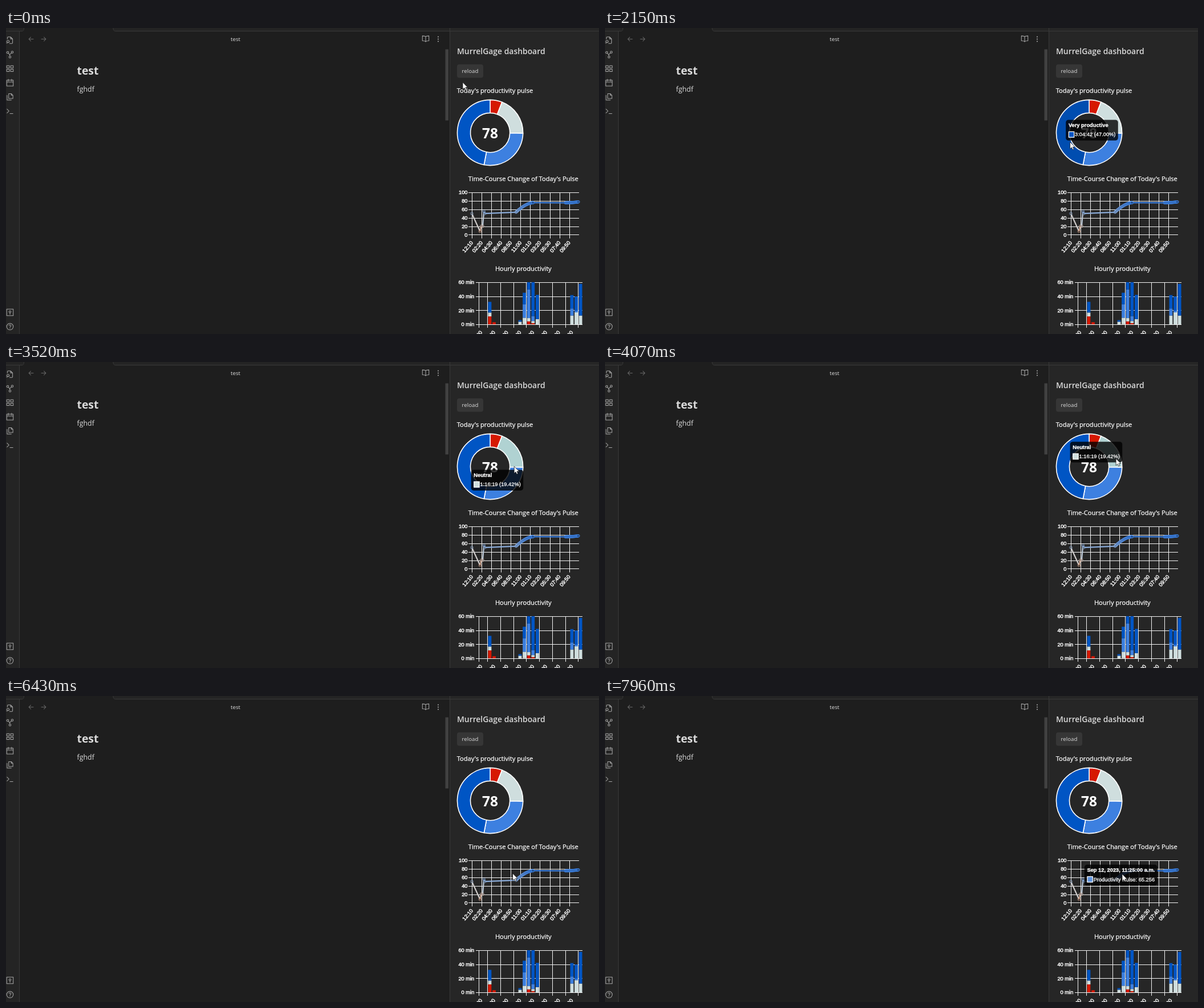
Write an HTML page that moves like this. It is 1040 px wide and 538 px high and loops after 8 s.

```html
<!DOCTYPE html>
<html lang="en">
<head>
<meta charset="utf-8">
<title>Productivity dashboard</title>
<style>
  html, body { margin: 0; width: 100%; height: 100%; overflow: hidden; background: #1e1e1e; }
  svg { display: block; width: 100vw; height: 100vh; }
  text { font-family: "Open Sans", "Noto Sans", sans-serif; fill: #dadada; white-space: pre; }
  .title { font-size: 11.1px; fill: #fff; stroke: #fff; stroke-width: .25px; }
  .axis, .tip { font-family: "Liberation Sans", Arial, sans-serif; font-size: 9.3px; fill: #fff; stroke: #fff; }
  .axis { stroke-width: .45px; }
  .tip { stroke-width: .3px; }
  .bold { font-weight: 700; }
  .icon { fill: none; stroke: #a6a6a6; stroke-width: 1.8; stroke-linecap: round; stroke-linejoin: round; }
  .faint { opacity: .55; }
  .grid { fill: none; stroke: #f4f4f4; stroke-width: 1; }
</style>
</head>
<body>
<svg id="stage" viewBox="0 0 1040 538" preserveAspectRatio="none"></svg>
<script>
const stage = document.getElementById("stage");
const RED = "#d61800", NEUTRAL = "#cfdede", LIGHT = "#3d80e0", DARK = "#0055c4";
const LOOP = 8000;

const mix = (a, b, k) => a + (b - a) * k;
const clamp = (v, low, high) => Math.max(low, Math.min(high, v));
const bell = (x, width) => Math.exp(-x * x / width);
const range = (n, fn) => Array.from({ length: n }, (_, i) => fn(i));
const pad = n => String(n).padStart(2, "0");
const crisp = v => Math.round(v) + .5;

// Piecewise linear lookup: rows are [key, value, value, ...].
function lookup(rows, key) {
  if (key <= rows[0][0]) return rows[0].slice(1);
  const next = rows.findIndex(row => row[0] > key);
  if (next < 0) return rows.at(-1).slice(1);
  const a = rows[next - 1], b = rows[next];
  const k = (key - a[0]) / (b[0] - a[0]);
  return a.slice(1).map((v, i) => mix(v, b[i + 1], k));
}

const rect = (x, y, w, h, fill, extra = "") =>
  `<rect x="${x}" y="${y}" width="${w}" height="${h}" fill="${fill}" ${extra}/>`;
const text = (x, y, value, cls = "", extra = "") =>
  `<text x="${x}" y="${y}" class="${cls}" ${extra}>${value}</text>`;
const icon = (x, y, d, cls = "") =>
  `<path class="icon ${cls}" transform="translate(${x} ${y}) scale(.57) translate(-12 -12)" d="${d}"/>`;
const ring = (x, y, r) => `M${x - r} ${y}a${r} ${r} 0 1 0 ${2 * r} 0a${r} ${r} 0 1 0 ${-2 * r} 0`;
const box = (x, y, w, h) => `M${x} ${y}h${w}v${h}h${-w}z`;
const middle = 'text-anchor="middle"';
const tickLabel = (x, y, value) => text(x, y + 3.2, value, "axis", 'text-anchor="end"');
const slanted = (x, y, value) =>
  text(0, 3.3, value, "axis", `text-anchor="end" transform="translate(${x} ${y}) rotate(-50)"`);

function editor() {
  const ribbon = [
    "M14 2v6h6M4 8V4a2 2 0 0 1 2-2h8l6 6v12a2 2 0 0 1-2 2h-7M2 21l2-2" + ring(6, 16, 3.5),
    ring(5, 6, 3) + ring(19, 5, 3) + ring(12, 20, 3) + "M7 8l4 5 6-6M11 13l1 4",
    box(2, 3, 8, 7) + box(14, 3, 8, 7) + box(2, 14, 8, 7) + box(14, 14, 8, 7),
    box(2, 4, 20, 18) + "M2 10h20M7 1v6M17 1v6",
    "M16 2H8v15h13V7zM16 2v5h5M3 7v15h13",
    "M3 18l6-6-6-6M12 20h9",
  ];
  return rect(0, 0, 1040, 538, "#1e1e1e")
    + rect(0, 0, 24, 538, "#242424") + rect(0, 0, 1040, 5, "#242424")
    + rect(779, 0, 261, 538, "#262626")
    + `<path d="M28 5.5Q31.5 5.5 31.5 0H188Q188 5.5 191.5 5.5Z" fill="#1e1e1e"/>
       <path d="M0 5.5H28Q31.5 5.5 31.5 0M188 0Q188 5.5 191.5 5.5H1040M23.5 5.5V538M778.5 0V538"
         fill="none" stroke="#393939"/>`
    + rect(770.5, 37.5, 5.5, 125, "#414141")
    + ribbon.map((d, i) => icon(7, 21.5 + i * 24.9, d)).join("")
    + icon(7, 500, box(2, 2, 20, 20) + ring(12, 10, 3) + "M12 13v5")
    + icon(7, 525, ring(12, 12, 10) + "M9 9a3 3 0 1 1 4 3q-1 1-1 2M12 17.5v.5")
    + icon(44, 19.5, "M19 12H5M11 6l-6 6 6 6", "faint")
    + icon(66, 19.5, "M5 12h14M13 6l6 6-6 6", "faint")
    + icon(736, 19, "M12 6v15M12 6q-2-3-10-3v15q8 0 10 3q2-3 10-3V3q-8 0-10 3")
    + icon(758, 19.5, ring(12, 5, 1) + ring(12, 12, 1) + ring(12, 19, 1))
    + text(402.5, 23.3, "test", "", `font-size="9.75" ${middle}`)
    + text(124.5, 82, "test", "bold", 'font-size="19.4"')
    + text(124.5, 111.5, "fghdf", "", 'font-size="12.4"')
    + text(791, 45.8, "MurrelGage dashboard", "", 'font-size="13.9" font-weight="600"')
    + rect(791, 64, 46, 23.5, "#363636", 'rx="4"')
    + text(814, 79.3, "reload", "", `font-size="9.7" ${middle}`)
    + text(790.7, 114, "Today's productivity pulse", "title")
    + text(907.3, 269, "Time-Course Change of Today's Pulse", "title", middle)
    + text(907.3, 426.7, "Hourly productivity", "title", middle);
}

// Doughnut chart
const donut = { x: 849.1, y: 184, outer: 57.6, inner: 34.6 };
const segments = [
  { share: 5.9, color: RED, hover: "#c01600" },
  { share: 19.42, color: NEUTRAL, hover: "#b0d2d2", title: "Neutral", label: "1:16:19 (19.42%)" },
  { share: 27.68, color: LIGHT, hover: "#026fff", title: "Productive", label: "1:48:47 (27.68%)" },
  { share: 47, color: DARK, hover: "#004db0", title: "Very productive", label: "3:04:42 (47.00%)" },
];
segments.forEach((s, i) => {
  s.start = i ? segments[i - 1].end : 0;
  s.end = s.start + s.share;
});

function onDonut(r, share) {
  const a = share / 100 * 2 * Math.PI;
  return [donut.x + r * Math.sin(a), donut.y - r * Math.cos(a)];
}

function doughnut() {
  const { outer, inner } = donut;
  return segments.map(({ start, end, color }) =>
    `<path class="segment" fill="${color}" stroke="#fff" stroke-width="1.6" stroke-linejoin="round"
      d="M${onDonut(outer, start)}A${outer} ${outer} 0 0 1 ${onDonut(outer, end)}
         L${onDonut(inner, end)}A${inner} ${inner} 0 0 0 ${onDonut(inner, start)}Z"/>`).join("")
    + text(donut.x, 193.8, "78", "bold", `font-size="24.5" ${middle} style="fill:#fff"`);
}

// Line chart: one sample every five minutes.
const SAMPLE = .656, MORNING = 46;
const pulseY = value => 363.4 - value * .745;
const pulseStops = [[8, 212, 158, 128], [32, 206, 210, 214], [75, 61, 128, 224]];
const pulseColor = value => `rgb(${lookup(pulseStops, value).map(Math.round)})`;
const morningX = i => 894.4 + i * SAMPLE;
const morningPulse = i => 53 + 22.5 * (1 - (1 - i / MORNING) ** 1.7055);

function lineChart() {
  const points = [
    [817, 50], [831.4, 8], [833.4, 20], [836, 20], [838.2, 55], [839.6, 50],
    ...range(MORNING + 1, i => [morningX(i), morningPulse(i)]),
    ...range(36, i => [981 + i * SAMPLE, 75.3 + i * i / 560]),
  ];
  const tickX = i => 817 + i * 17.07;
  const lines = range(6, i => `M811 ${crisp(pulseY(i * 20))}H1005`).join("")
    + range(11, i => `M${crisp(tickX(i))} 289V370`).join("");
  const clock = i => {
    const minutes = 10 + i * 130;
    return `${pad(Math.floor(minutes / 60) % 12 || 12)}:${pad(minutes % 60)}`;
  };
  return `<path class="grid" d="${lines}"/>`
    + range(6, i => tickLabel(809.5, pulseY(i * 20), i * 20)).join("")
    + range(11, i => slanted(tickX(i), 375.6, clock(i))).join("")
    + points.slice(1).map(([x, v], i) => {
        const [px, pv] = points[i];
        return `<path d="M${px} ${pulseY(pv)}L${x} ${pulseY(v)}" stroke="${pulseColor((v + pv) / 2)}" stroke-width="2.2"/>`;
      }).join("")
    + points.map(([x, v]) =>
        `<circle cx="${x}" cy="${pulseY(v)}" r="2.3" fill="#0002" stroke="${pulseColor(v)}" stroke-width=".8"/>`).join("");
}

// Bar chart: each session gives the minutes of an hour by kind; the rest of the total is dark.
const sessions = [
  { from: 2, to: 3, total: h => 32 - 29 * (h - 2), red: h => 11.3 - 8 * (h - 2),
    neutral: h => 5.3 * (3 - h), light: h => 3 - h },
  { from: 9, to: 13, total: h => 66 - 10 * (h - 11.45) ** 2, red: h => 5 - 4 * Math.abs(h - 11.2),
    neutral: h => 1.5 + 4.5 * Math.abs(h - 11.7), light: h => 43 * bell(h - 10.8, .8) },
  { from: 21, to: 23, total: h => 38 + 10 * (h - 21.6) ** 2, red: () => 0,
    neutral: h => 17 - 4.5 * Math.abs(h - 22), light: h => 10 * bell(h - 21, .7) },
];

function barChart() {
  const slot = 7.58, left = 829.5;
  const minuteY = minutes => 521 - minutes * 1.235;
  const gridX = [left, ...range(8, i => left + (2 + 3 * i) * slot)];
  const lines = range(4, i => `M824 ${crisp(minuteY(i * 20))}H1011`).join("")
    + gridX.map(x => `M${crisp(x - .5)} 447V527`).join("");

  function bar(session, hour) {
    const total = clamp(session.total(hour), 0, 60);
    const red = clamp(session.red(hour), 0, total);
    const neutral = clamp(session.neutral(hour), 0, (total - red) * .6);
    const light = session.light(hour);
    let sum = 0;
    return [[RED, red], [NEUTRAL, neutral], [LIGHT, light], [DARK, total - red - neutral - light]]
      .map(([color, minutes]) => {
        const height = Math.max(0, minutes);
        sum += height;
        return rect(left + hour * slot + .9, minuteY(sum), 5.8, height * 1.235, color);
      }).join("");
  }

  return `<path class="grid" d="${lines}"/>`
    + range(4, i => tickLabel(821.3, minuteY(i * 20), `${i * 20} min`)).join("")
    + range(8, i => slanted(left + (.5 + 3 * i) * slot, 533.5, pad(i * 3) + ":00")).join("")
    + sessions.map(s => range(s.to - s.from + 1, i => bar(s, s.from + i)).join("")).join("");
}

// Hover script
function overSegment(t, segment) {
  const { start, end, title, label, color } = segments[segment];
  const [x, y] = onDonut(46, (start + end) / 2);
  return { t, x: clamp(x, 854, 861.4), y, w: 91.6, title, label, color, segment, alpha: 1 };
}

function overSample(t, i) {
  const value = morningPulse(i), minutes = 600 + i * 5;
  return {
    t, x: morningX(i) - .8, y: pulseY(value), w: 128, segment: -1, alpha: 1, color: pulseColor(value),
    title: `Sep 12, 2023, ${Math.floor(minutes / 60)}:${pad(minutes % 60)}:00 a.m.`,
    label: `Productivity Pulse: ${+value.toFixed(3)}`,
  };
}

const hovers = [
  overSegment(1620, 3), overSegment(2575, 2), overSegment(3450, 1), { t: 4700, alpha: 0, segment: -1 },
  ...range(5, k => overSample(k ? 6980 + k * 150 : 6500, Math.round(k * 17 / 4))),
];

// Tooltips glide to their new place while fading.
function pose(tip, t) {
  const age = t - tip.t, from = tip.from;
  const k = 1 - (1 - clamp(age / 400, 0, 1)) ** 4;
  const glide = from && from.alpha > 0;
  return {
    x: glide ? mix(from.x, tip.x, k) : tip.x,
    y: glide ? mix(from.y, tip.y, k) : tip.y,
    alpha: mix(from ? from.alpha : 0, tip.alpha, clamp(age / 200, 0, 1)),
  };
}

function tooltip(tip, t) {
  const { x, y, alpha } = pose(tip, t);
  return `<g opacity="${alpha}" transform="translate(${x - tip.w / 2} ${y - 18.2})">`
    + rect(0, 0, tip.w, 36.4, "#000", 'fill-opacity=".8" rx="4.6"')
    + text(4.7, 12.4, tip.title, "tip bold")
    + rect(5.2, 20.9, 9.3, 9.8, tip.color, 'stroke="#fff" stroke-width="1.3"')
    + text(15.9, 29, tip.label, "tip") + "</g>";
}

// Cursor waypoints: time, x, y
const waypoints = [
  [500, 801, 95.5], [1530, 800, 148.5], [2150, 815, 200], [2700, 855, 221.5], [3450, 891, 184],
  [4070, 896.5, 168.5], [4700, 907, 184], [5050, 904, 222], [6220, 887, 309], [7050, 893, 320], [7960, 907, 313],
];

stage.innerHTML = editor() + doughnut() + lineChart() + barChart() + `<g id="tooltip"></g>
  <path id="cursor" d="M0 0V12.2L2.8 9.7 4.6 13.7 6.6 12.8 4.9 8.9H8.7Z" fill="#fff" stroke="#111" stroke-width=".7"/>`;
const tooltipLayer = document.getElementById("tooltip");
const cursor = document.getElementById("cursor");
const segmentPaths = [...stage.querySelectorAll(".segment")];

function draw(time) {
  const step = 69.1;
  const t = time < 500 ? time : 500 + Math.floor((time - 488) / step) * step;
  cursor.setAttribute("transform", `translate(${lookup(waypoints, t)})`);

  let tip = null;
  for (const event of hovers) {
    if (event.t > t) break;
    tip = { ...tip, ...event, from: tip && pose(tip, event.t) };
  }
  tooltipLayer.innerHTML = tip ? tooltip(tip, t) : "";
  segmentPaths.forEach((path, i) =>
    path.setAttribute("fill", tip?.segment === i ? segments[i].hover : segments[i].color));
}

const began = performance.now();
function frame() {
  draw((performance.now() - began) % LOOP);
  requestAnimationFrame(frame);
}
frame();
</script>
</body>
</html>
```
